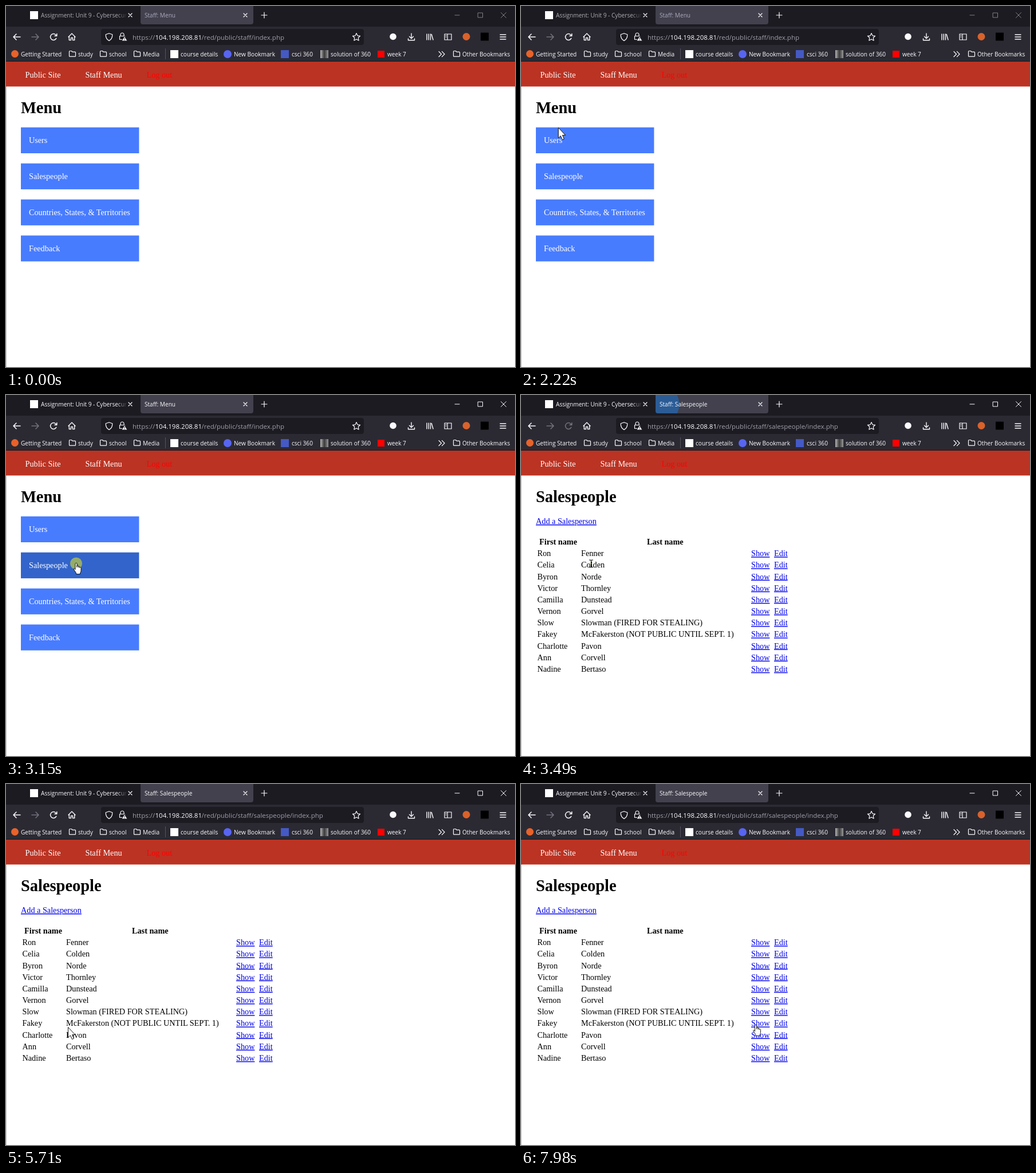
An HTML page that plays this animation: 889 px wide and 630 px high, repeating every 8 s.

```html
<!DOCTYPE html>
<html lang="en">
<head>
<meta charset="utf-8">
<title>Staff pages</title>
<style>
  html, body { margin: 0; width: 100%; height: 100%; overflow: hidden; background: #fff; }
  svg { display: block; width: 100%; height: 100%; }
  text { white-space: pre; }
  .ui { font: 10.1px "Open Sans", "Noto Sans", sans-serif; fill: #fbfbfe; }
  .url { font-size: 11.5px; fill: #9f9ea8; }
  .page { font: 14.22px "Liberation Serif", "Noto Serif", serif; fill: #000; }
  .page .h1 { font-size: 28.44px; font-weight: bold; }
  .page .th { font-weight: bold; }
  .page .nav { fill: #fff; }
  .page .link { fill: #00e; text-decoration: underline; }
  .ic { fill: none; stroke: #fbfbfe; stroke-width: 1.2; stroke-linecap: round; stroke-linejoin: round; }
</style>
</head>
<body>
<svg id="stage" viewBox="0 0 889 630" xmlns="http://www.w3.org/2000/svg"></svg>
<script>
const LOOP = 8000, FOCUS = 3090, SWAP = 3350, BURST = 3420;

const text = (x, y, s, cls = '', extra = '') =>
  `<text x="${x}" y="${y}" class="${cls}" ${extra}>${s.replace(/&/g, '&amp;')}</text>`;
const rect = (x, y, w, h, fill, extra = '') =>
  `<rect x="${x}" y="${y}" width="${w}" height="${h}" fill="${fill}" ${extra}/>`;
const dot = (x, y, r, fill, extra = '') =>
  `<circle cx="${x}" cy="${y}" r="${r}" fill="${fill}" ${extra}/>`;
const icon = (x, y, d, extra = '') =>
  `<path class="ic" transform="translate(${x} ${y})" d="${d}" ${extra}/>`;

const CROSS = 'M-3-3L3 3M3-3L-3 3';
const FOLDER = 'M-5.5-4q0-1 1-1h3l1.5 1.7h4.5q1 0 1 1v6q0 1-1 1h-9q-1 0-1-1z';

function tabBar() {
  return rect(0, 0, 889, 36, '#1c1b22') +
    rect(235, -4, 197, 36, '#42414d', 'rx="4"') +
    '<g clip-path="url(#tab)"><circle id="burst" cx="242" cy="16" fill="#0a84ff"/></g>' +
    rect(42, 9, 14, 14, '#fff') +
    '<g id="titles">' +
    text(61, 20, 'Assignment: Unit 9 - Cybersecur') +
    text(242, 20, 'Staff: Menu', '', 'id="title"') + '</g>' +
    rect(193, 6, 19, 20, 'url(#fade)') +
    icon(217, 16, CROSS) + icon(418, 16, CROSS) +
    icon(451, 16, 'M-5 0H5M0-5V5', 'stroke-width="1.5"') +
    '<g id="controls">' +
    icon(788, 16, 'M-4 0H4', 'style="stroke-width:1"') +
    icon(828.5, 16, 'M-4-4H4V4H-4z', 'style="stroke-width:1"') +
    icon(869, 16, 'M-4.5-4.5L4.5 4.5M4.5-4.5L-4.5 4.5', 'style="stroke-width:1"') + '</g>';
}

function toolBar() {
  return rect(0, 36, 889, 61, '#2b2a33') +
    icon(19, 54, 'M6 0H-6M-1-5L-6 0L-1 5', 'style="stroke-width:1.5"') +
    icon(51, 54, 'M-6 0H6M1-5L6 0L1 5', 'style="stroke-width:1.5;stroke:#74737d"') +
    icon(83, 54, 'M4.8 2.4A5.4 5.4 0 1 1 3.8-3.8L5.5-2M5.8-5.5V-1.8H2', 'id="reload" style="stroke-width:1.5"') +
    icon(115, 54, 'M-6 0L0-6L6 0M-4.7-1V5.5H-1.5V1.5H1.5V5.5H4.7V-1', 'style="stroke-width:1.4"') +
    rect(166, 40, 459, 28, '#1c1b22', 'rx="4"') +
    icon(180, 54, 'M0-6.3L5.8-4.3Q6 3.5 0 6.6Q-6 3.5-5.8-4.3z') +
    icon(203, 53, 'M-4.5-.5H4.5V5.5H-4.5zM-3-.5V-3a3 3 0 0 1 6 0V-.5') +
    '<path d="M207 52.5L212 61H202z" fill="#fbfbfe" stroke="#1c1b22"/>' +
    rect(206.5, 55.5, 1, 2.6, '#1c1b22') + rect(206.5, 58.8, 1, 1, '#1c1b22') +
    text(221, 58.5, 'https://', 'url') +
    text(260.5, 58.5, '104.198.208.81', 'url', 'style="fill:#fbfbfe"') +
    text(341.5, 58.5, '', 'url', 'id="path"') +
    icon(612, 54, 'M0-6.5L2-2.2L6.6-1.7L3.2 1.5L4.1 6.2L0 3.9L-4.1 6.2L-3.2 1.5L-6.6-1.7L-2-2.2z') +
    dot(676, 53.5, 5.8, '#fbfbfe') +
    icon(708, 54, 'M0-6V2.5M-3.5-.8L0 2.7L3.5-.8M-5.5 3V5.7H5.5V3', 'style="stroke-width:1.4"') +
    icon(740, 54, 'M-5-5V5M-1.7-5V5M1.5-5V5M3.2-4.5L6 5', 'style="stroke-width:1.4"') +
    icon(772, 54, 'M-6-5H6V5H-6zM-1-5V5M-4-2.5H-3M-4 0H-3') +
    dot(804, 53.5, 6.5, '#d9622b') +
    rect(829, 46.5, 14, 14, '#000') +
    icon(868, 54, 'M-5-4H5M-5 0H5M-5 4H5', 'style="stroke-width:1.4"');
}

function bookmarks() {
  const y = 87.5;
  const folders = [[116, 'study'], [170, 'school'], [229, 'Media'], [787, 'Other Bookmarks']];
  const marks = [[26, 'Getting Started'], [305, 'course details'], [398, 'New Bookmark'],
    [499, 'csci 360'], [567, 'solution of 360'], [666, 'week 7']];
  return folders.map(([x, s]) => icon(x, 83.5, FOLDER) + text(x + 10, y, s)).join('') +
    marks.map(([x, s]) => text(x, y, s)).join('') +
    dot(15.5, 83.5, 6.5, '#e8622a') +
    rect(278, 74, 1, 19, '#55545e') +
    rect(287, 77, 14, 14, '#fff') +
    dot(387, 84, 7, '#5865f2') +
    rect(480, 77, 14, 14, '#4559c4') +
    rect(549, 77, 14, 14, 'url(#photo)') +
    rect(649, 78, 12, 12, '#f00') +
    icon(761, 84, 'M-5-4.5L-.5 0L-5 4.5M.5-4.5L5 0L.5 4.5');
}

const items = ['Users', 'Salespeople', 'Countries, States, & Territories', 'Feedback'];
const itemY = i => 211.8 + i * 62.9;

const people = `Ron,Fenner Celia,Colden Byron,Norde Victor,Thornley Camilla,Dunstead Vernon,Gorvel
  Slow,Slowman Fakey,McFakerston Charlotte,Pavon Ann,Corvell Nadine,Bertaso`
  .split(/\s+/).map(p => p.split(','));
const notes = { Slow: ' (FIRED FOR STEALING)', Fakey: ' (NOT PUBLIC UNTIL SEPT. 1)' };

function menuPage() {
  return text(26, 187, 'Menu', 'h1') + items.map((s, i) =>
    rect(26, itemY(i), 206.4, 45.2, '#487cff', 'class="item"') +
    text(40, itemY(i) + 27.2, s, 'nav')).join('');
}

function peoplePage() {
  return text(26, 187, 'Salespeople', 'h1') +
    text(26, 225, 'Add a Salesperson', 'link') +
    text(32, 261, 'First name', 'th') + text(220, 261, 'Last name', 'th') +
    people.map(([first, last], i) => {
      const y = 281.2 + i * 20.17;
      return text(28.5, y, first) + text(105, y, last + (notes[first] || '')) +
        text(402, y, 'Show', 'link') + text(442, y, 'Edit', 'link');
    }).join('');
}

const cursors = `
  <path id="arrow" d="M.5.5V18.5L4.5 14.8L7.5 21.5L10.5 20.2L7.6 13.6H12.8z" fill="#fff" stroke="#000" stroke-width=".9"/>
  <path id="hand" d="M-1.5 10.5V.8Q-1.5-.8 0-.8T1.5.8V6.5V5.2Q3-.2 4 5.6V7Q4.2 5 5.3 5.2T6.3 7.5Q6.8 6 7.8 6.6T8.5 8.6V12.5Q8.5 15 7 16.5V18.5H0V16.5L-3.8 11Q-5 8.6-3.2 8.5Z" fill="#fff" stroke="#000" stroke-width=".9"/>
  <path id="beam" d="M-3.5-6H-1Q0-6 0-5Q0-6 1-6H3.5M0-5V5.5M-3.5 6.5H-1Q0 6.5 0 5.5Q0 6.5 1 6.5H3.5" fill="none" stroke-width="1.1"/>`;

document.getElementById('stage').innerHTML = `
  <defs>
    <clipPath id="tab"><rect x="235" y="-4" width="197" height="36" rx="4"/></clipPath>
    <linearGradient id="fade"><stop stop-color="#1c1b22" stop-opacity="0"/><stop offset="1" stop-color="#1c1b22"/></linearGradient>
    <linearGradient id="photo"><stop stop-color="#b5b5b5"/><stop offset=".5" stop-color="#3a3a3a"/><stop offset="1" stop-color="#999"/></linearGradient>
  </defs>
  <rect width="889" height="630" fill="#fff"/>
  <rect y="97" width="1" height="533" fill="#c8c8c8"/>
  <g class="ui">${tabBar()}${toolBar()}${bookmarks()}</g>
  <g class="page">
    ${rect(0, 96.5, 889, 44, '#bb3323')}${rect(0, 96, 889, 1, '#17161c')}
    ${text(33.5, 124.7, 'Public Site', 'nav')}${text(138.5, 124.7, 'Staff Menu', 'nav')}
    ${text(245.5, 124.7, 'Log out', '', 'fill="#f00"')}
    <g id="menu">${menuPage()}</g><g id="people">${peoplePage()}</g>
  </g>
  <circle id="press" fill="#d7dc28" fill-opacity=".6"/>
  <g id="cursor">${cursors}</g>`;

const $ = id => document.getElementById(id);
const set = (id, attrs) => { for (const k in attrs) $(id).setAttribute(k, attrs[k]); };
const show = (id, on) => { $(id).style.display = on ? '' : 'none'; };
const buttons = [...document.querySelectorAll('.item')];

// Text areas of the second page, measured before it is hidden
const zones = [...document.querySelectorAll('#people text')].map(el => ({
  x: +el.getAttribute('x'), y: +el.getAttribute('y') - 4.4,
  w: el.getComputedTextLength(), shape: el.classList.contains('link') ? 'hand' : 'beam'
}));

// Pointer moves: start, end, then points x, y
const moves = [
  [320, 980, 140, 640, 420, 560, 735, 450, 690, 370, 542, 321],
  [1240, 2080, 542, 321, 330, 262, 150, 200, 60, 173],
  [2080, 2700, 60, 173, 66, 216, 90, 262, 118, 290, 122.5, 294],
  [4030, 4900, 122.5, 294, 80, 180, 230, 62, 422, 70, 330, 240, 192, 353],
  [4900, 5710, 192, 353, 165, 428, 125, 429, 108, 424],
  [5710, 5850, 108, 424, 100, 419],
  [5920, 6050, 100, 419, 101, 416],
  [6310, 6320, 101, 416, 102, 416],
  [6510, 7320, 102, 416, 138, 414, 240, 411, 326, 420],
  [7320, 7980, 326, 420, 365, 422, 400, 422, 410, 421]
];

const spline = (a, b, c, d, u) =>
  b + u / 2 * (c - a + u * (2 * a - 5 * b + 4 * c - d + u * (3 * (b - c) + d - a)));

function pointer(t) {
  const [start, end, ...pts] = moves.filter(m => m[0] <= t).pop() || moves[0];
  const last = pts.length / 2 - 1;
  const s = Math.max(0, Math.min(1, (t - start) / (end - start))) * last;
  const i = Math.min(Math.floor(s), last - 1);
  const at = (k, axis) => pts[2 * Math.max(0, Math.min(last, k)) + axis];
  return [0, 1].map(a => spline(at(i - 1, a), at(i, a), at(i + 1, a), at(i + 2, a), s - i));
}

function draw(t) {
  const active = t >= FOCUS, loaded = t >= SWAP;
  const [x, y] = pointer(t);

  $('title').textContent = loaded ? 'Staff: Salespeople' : 'Staff: Menu';
  $('path').textContent = '/red/public/staff/' + (loaded ? 'salespeople/' : '') + 'index.php';
  set('titles', { opacity: active ? 1 : .65 });
  set('title', { style: active ? '' : 'fill:#e4e2ff' });
  set('controls', { opacity: active ? 1 : .45 });
  $('reload').style.stroke = t >= 3220 && t < 3820 ? '#74737d' : '';
  show('menu', !loaded);
  show('people', loaded);

  const p = (t - BURST) / 400;
  const bursting = p >= 0 && p < 1;
  set('burst', { r: bursting ? 194 * p : 0, opacity: bursting ? .5 * (1 - p) : 0 });

  let shape = 'arrow';
  buttons.forEach((b, i) => {
    const dy = y - itemY(i);
    const over = !loaded && x > 26 && x < 232 && dy > 2 && dy < 45;
    b.setAttribute('fill', over ? '#3264cb' : '#487cff');
    if (over) shape = 'hand';
  });
  if (loaded) {
    const z = zones.find(z => x >= z.x && x <= z.x + z.w && Math.abs(y - z.y) < 5.5);
    if (z) shape = z.shape;
  }
  if (y > 40 && y < 68 && x > 218 && x < 600) shape = 'beam';
  for (const id of ['arrow', 'hand', 'beam']) show(id, id === shape);
  set('beam', { stroke: y < 96 ? '#fff' : '#000' });
  set('cursor', { transform: `translate(${x} ${y})` });

  const fade = Math.max(0, Math.min(1, 1 - (t - 3160) / 400));
  set('press', { cx: x, cy: y, r: active ? 10.5 * fade : 0 });
}

const begin = performance.now();
function tick() {
  draw((performance.now() - begin) % LOOP);
  requestAnimationFrame(tick);
}
tick();
</script>
</body>
</html>
```
